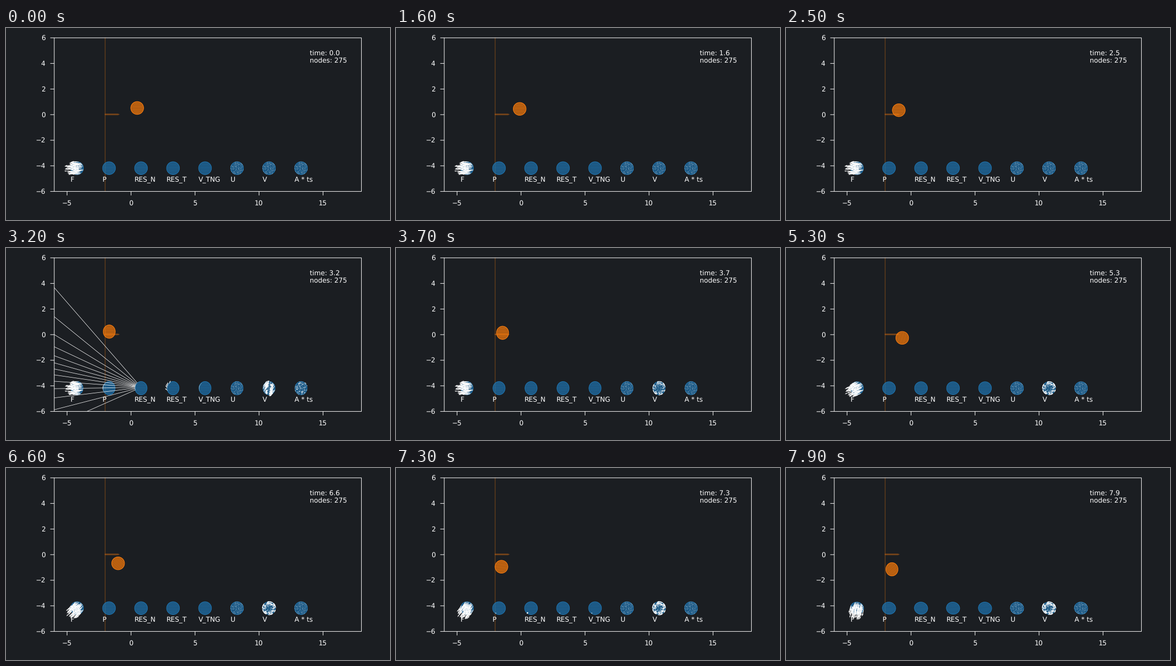
These frames come from a looping animation (732 px wide and 366 px high, 8000 ms). A matplotlib script:

```python
import numpy as np
import matplotlib.pyplot as plt
from matplotlib.animation import FuncAnimation
from matplotlib.collections import LineCollection
from matplotlib.patches import Polygon, Rectangle
from matplotlib.tri import Triangulation

BG, ORANGE, BLUE, INK = "#1b1e22", "#ff7f0e", "#1f77b4", "white"
FRAMES, INTERVAL = 80, 100
WALL_X, RADIUS, MAX_DEPTH = -2, 0.5, 0.18
TOUCH_X = WALL_X + RADIUS
LABELS = ["F", "P", "RES_N", "RES_T", "V_TNG", "U", "V", "A * ts"]

# Flight, bounce, flight, bounce: contact begins at HIT and ends at LEAVE.
PULL, REBOUND_PULL, DRIFT = 0.46, 0.496, 0.0275
APEX_TIME, APEX_X = 5.45, -0.664
HALF_FLIGHT = np.sqrt(2 * (APEX_X - TOUCH_X) / REBOUND_PULL)
HIT = (np.sqrt(2 * (0.5 - TOUCH_X) / PULL), APEX_TIME + HALF_FLIGHT)
LEAVE = (APEX_TIME - HALF_FLIGHT, 7.85)
HIT_SPEED = (PULL * HIT[0], REBOUND_PULL * HALF_FLIGHT)
LEAVE_SPEED = (HIT_SPEED[1], 0.55)

plt.rcParams.update({"font.family": "DejaVu Sans", "font.size": 10,
                     "text.hinting": "no_hinting"})
rng = np.random.default_rng(4)


def pos_x(t):
    for hit, leave, v_in, v_out in zip(HIT, LEAVE, HIT_SPEED, LEAVE_SPEED):
        if hit <= t <= leave:
            span = leave - hit
            u = (t - hit) / span
            return TOUCH_X - span * u * (1 - u) * (v_in * (1 - u) + v_out * u)
    if t < HIT[0]:
        return 0.5 - PULL * t * t / 2
    if t < HIT[1]:
        return APEX_X - REBOUND_PULL * (t - APEX_TIME) ** 2 / 2
    return TOUCH_X + LEAVE_SPEED[1] * (t - LEAVE[1])


def pos_y(t):
    free = min(t, HIT[1])
    return 0.5 - DRIFT * free ** 2 - 0.33 * (t - free)


def turn(t):
    return np.radians(np.interp(t, [3.7, 7.3, 7.9], [0, 58, 78]))


def spin(t):
    return np.interp(t, [3, 3.4, 7.9], [0, 0.28, 0.43])


def squash(t):
    """Each hit flattens the disc, which then relaxes."""
    since = np.maximum(t - np.array(HIT), 0) / 0.4
    return 0.068 * np.sum(since * np.exp(1 - since))


def rotation(angle):
    c, s = np.cos(angle), np.sin(angle)
    return np.array([[c, -s], [s, c]])


def polar(angle):
    return np.column_stack([np.cos(angle), np.sin(angle)])


def make_nodes(count=275, rim_count=54):
    """Triangular lattice in a disc, closed by a ring of rim nodes."""
    step = 0.0575
    i, j = np.meshgrid(np.arange(-12, 13), np.arange(-12, 13))
    grid = np.column_stack([((i + j / 2) * step).ravel(),
                            (j * step * np.sqrt(3) / 2).ravel()])
    grid = grid[np.argsort(np.hypot(*grid.T), kind="stable")]
    rim = RADIUS * polar(np.linspace(0, 2 * np.pi, rim_count, endpoint=False))
    return np.vstack([rim, grid[:count - rim_count]]), rim_count


nodes, rim_count = make_nodes()
edges = Triangulation(*nodes.T).edges
picked = rng.permutation(len(nodes))[:105]
force_length = rng.normal(0.42, 0.05, len(picked))
force_angle = np.pi + rng.normal(0, 0.06, len(picked))
jitter = rng.normal(0, 1, (len(picked), 2))
fan_angles = np.radians(np.polyval([0.065, -0.18, 3.9, 8.2], np.arange(7, -6, -1)))

fig = plt.figure(figsize=(8, 4), dpi=91.5, facecolor=BG)
ax = fig.add_axes([0.125, 0.15, 0.8, 0.8], facecolor=BG)
ax.set(xlim=(-6, 18), ylim=(-6, 6), xticks=range(-5, 16, 5), yticks=range(-6, 7, 2))
ax.tick_params(length=0, pad=13, labelcolor=INK)
ax.spines[:].set_visible(False)


def draw_frame(shift=0.019, length=0.31):
    """Soft-edged border and ticks, not snapped to whole pixels."""
    left, bottom = -6 + shift, -6 - shift
    ticks = [[(x + shift, bottom), (x + shift, bottom - length)] for x in ax.get_xticks()]
    ticks += [[(left, y - shift), (left - length, y - shift)] for y in ax.get_yticks()]
    ax.add_patch(Rectangle((left, bottom), 24, 12, fill=False, ec=INK, lw=0.8,
                           snap=False, clip_on=False, zorder=5))
    ax.add_collection(LineCollection(ticks, colors=INK, linewidths=0.8, snap=False,
                                     clip_on=False, zorder=5), autolim=False)


class Disc:
    def __init__(self, color):
        self.fill = ax.add_patch(Polygon(nodes[:rim_count], fc=color, alpha=0.5, lw=0, zorder=2))
        self.mesh = ax.add_collection(
            LineCollection([], colors=color, linewidths=0.15, zorder=2), autolim=False)
        self.rim = ax.add_patch(Polygon(nodes[:rim_count], fill=False, ec=color, lw=0.8, zorder=2))

    def place(self, points):
        self.fill.set_xy(points[:rim_count])
        self.rim.set_xy(points[:rim_count])
        self.mesh.set_segments(points[edges])


def arrows(count):
    zero = np.zeros(count)
    return ax.quiver(zero, zero, zero, zero, color=INK, units="xy", scale_units="xy",
                     angles="uv", scale=1, width=0.032, zorder=4)


def set_arrows(quiver, tails, vectors):
    quiver.set_offsets(tails)
    quiver.set_UVC(*vectors.T)


draw_frame()
ax.axvline(WALL_X, color=ORANGE, alpha=0.3, lw=1.2, zorder=1)
ax.add_patch(Polygon([(-2.06, 0), (-2, 0.06), (-1, 0.06), (-0.86, 0), (-1, -0.06), (-2, -0.06)],
                     fc=ORANGE, alpha=0.4, lw=0, zorder=3))

ball = Disc(ORANGE)
centers = {name: np.array([-4.2 + 2.5 * k, -4.2]) for k, name in enumerate(LABELS)}
copies = {name: Disc(BLUE) for name in LABELS}
field = {name: arrows(len(picked)) for name in ("F", "U", "V", "A * ts")}
contact = {name: arrows(len(fan_angles)) for name in ("P", "V_TNG")}
contact["RES_T"] = arrows(len(fan_angles[::3]))
fan = ax.add_collection(LineCollection([], colors=INK, linewidths=0.6, zorder=4), autolim=False)

for name, center in centers.items():
    ax.text(center[0] - 0.51, -5.27, name, color=INK, zorder=6)
readout = ax.text(13.98, 4, "", color=INK, zorder=6)


def draw_fields(t, body, alpha, strength):
    tails = body[picked]
    swirl = spin(t) * np.column_stack([tails[:, 1], -tails[:, 0]])
    shear = -0.9 * strength * tails[:, :1] * np.array([0.65, 0.75])
    vectors = {
        "F": force_length[:, None] * polar(force_angle + alpha),
        "U": np.zeros_like(tails),
        "V": swirl + shear,
        "A * ts": 0.05 * strength * jitter,
    }
    for name, quiver in field.items():
        set_arrows(quiver, tails + centers[name], vectors[name])


def draw_contact(strength, alpha):
    touching = strength > 0.01
    for artist in (fan, *contact.values()):
        artist.set_visible(touching)
    if not touching:
        return
    out = polar(np.pi + alpha - fan_angles * strength)
    along = np.column_stack([out[:, 1], -out[:, 0]])
    start = centers["RES_N"] + [0, 0.06] + 0.46 * out
    fan.set_segments(np.stack([start, start + 22 * strength ** 2 * out], axis=1))
    vectors = {"P": 0.07 * out, "V_TNG": 0.05 * along, "RES_T": (0.25 * along + 0.12 * out)[::3]}
    for name, quiver in contact.items():
        tails = out[::3] if name == "RES_T" else out
        set_arrows(quiver, centers[name] + 0.46 * tails, strength * vectors[name])


def update(frame):
    t = frame * INTERVAL / 1000
    alpha, s = turn(t), squash(t)
    center = np.array([pos_x(t), pos_y(t)])
    strength = np.clip((TOUCH_X - center[0]) / MAX_DEPTH, 0, 1)
    world = nodes @ rotation(-alpha).T * [1 - s, 1 + 0.6 * s]
    body = world @ rotation(alpha).T

    ball.place(world + center)
    for name, disc in copies.items():
        disc.place(body + centers[name])
    draw_fields(t, body, alpha, strength)
    draw_contact(strength, alpha)
    readout.set_text(f"time: {t:.1f}\nnodes: {len(nodes)}")
    return []


anim = FuncAnimation(fig, update, frames=FRAMES, interval=INTERVAL, repeat=True,
                     repeat_delay=0, blit=False)
plt.show()
```
